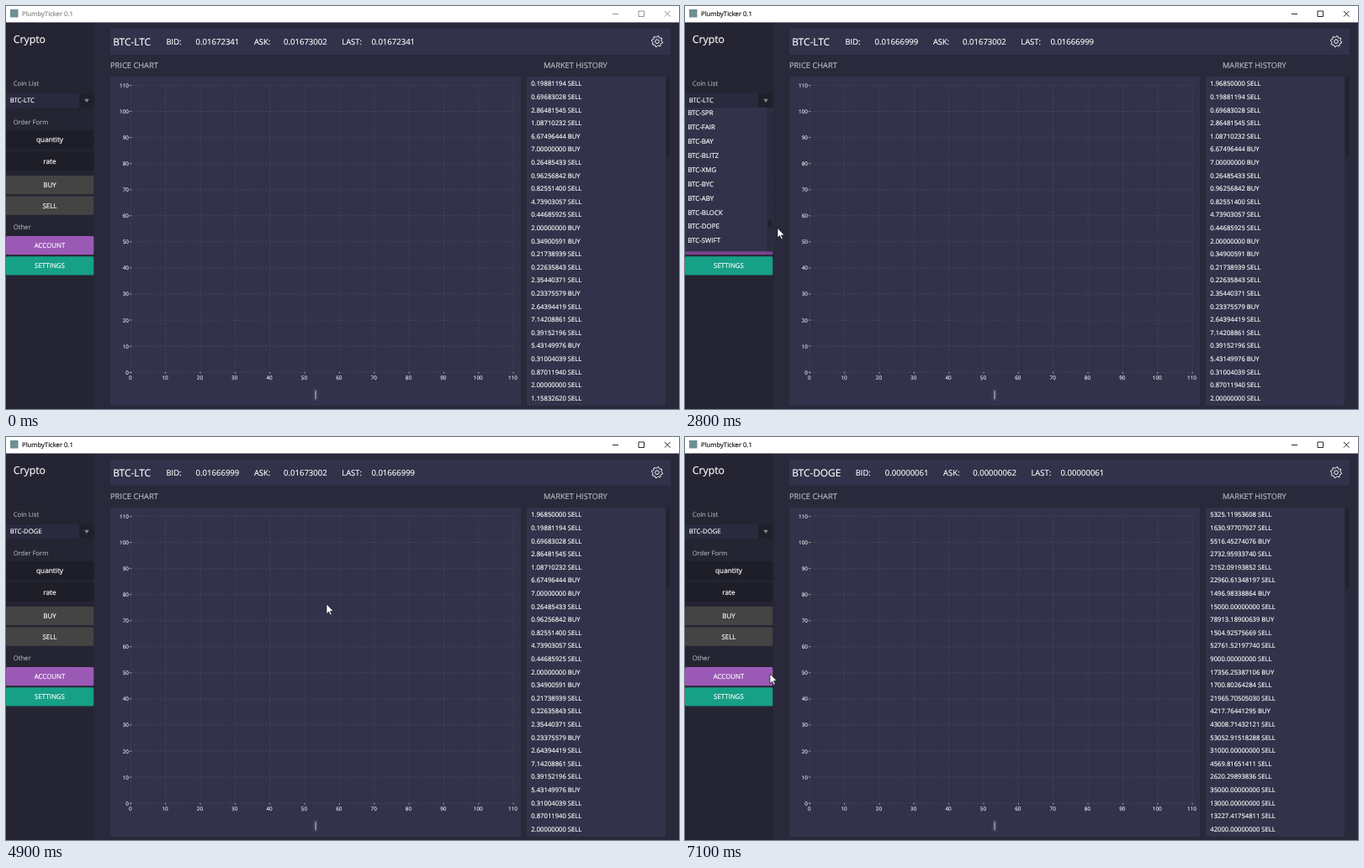
Write an HTML page that moves like this. It is 800x480 px and loops after 7200 ms.

```html
<!DOCTYPE html>
<html lang="en">
<head>
<meta charset="utf-8">
<title>PlumbyTicker</title>
<style>
  html, body { margin: 0; width: 100%; height: 100%; overflow: hidden; background: #29293b; }
  svg { display: block; width: 800px; height: 480px; }
  text {
    font-family: "Open Sans", "Noto Sans", sans-serif;
    text-rendering: geometricPrecision;
    white-space: pre;
    fill: currentColor;
    stroke: currentColor;
    stroke-width: .16px;
  }
</style>
</head>
<body>
<svg id="stage" viewBox="0 0 800 480"></svg>
<script>
const LOOP = 7200, STEP = 100;
const ENTER = 400, ACTIVATE = 1300, OPEN = 1600, DRAG_END = 3300, PICK = 4500, LOADED = 5200;
const ROW = 15.6, ROWS = 25, ROW_TOP = 84.9;
const ITEM = 16.94, ITEMS = 250, LAST_TOP = ITEMS - 10, MID = 198, LIST_TOP = 121.6;
const DRAG_TOP = 128.5, DRAG_BOTTOM = 293.2;
const BACK = '#29293b', PANEL = '#32324a', HOVER = '#2a2a3b';
const LIGHT = '#fff', SOFT = '#e2e2e8', HEADING = '#b8b8c0', MUTED = '#a6a6b0';

const stage = document.getElementById('stage');

function add(parent, tag, attrs) {
  const el = document.createElementNS('http://www.w3.org/2000/svg', tag);
  for (const k in attrs) el.setAttribute(k, attrs[k]);
  return parent.appendChild(el);
}
const rect = (parent, x, y, width, height, fill, rx = 0) =>
  add(parent, 'rect', { x, y, width, height, fill, rx });
const path = (parent, d, stroke, width = 1) =>
  add(parent, 'path', { d, stroke, 'stroke-width': width, fill: 'none' });

// Places text by the vertical middle of its capitals.
function label(parent, x, mid, size, str, color = LIGHT, anchor = 'start') {
  const el = add(parent, 'text', {
    x, y: mid + size * 0.357, 'font-size': size, color, 'text-anchor': anchor
  });
  el.textContent = str;
  return el;
}
const show = (el, on) => el.setAttribute('visibility', on ? 'visible' : 'hidden');
const write = (el, str) => { if (el.textContent !== str) el.textContent = str; };

function seeded(seed) {
  return () => (seed = seed * 16807 % 2147483647) / 2147483647;
}

function drawWindow() {
  rect(stage, 0, 19, 104.5, 461, '#242432');
  rect(stage, 124, 27, 666, 31, PANEL, 1);
  rect(stage, 124, 84, 488, 392, PANEL, 1);
  rect(stage, 619, 84, 165, 392, PANEL, 1);
  rect(stage, 784.8, 85, 4.4, 95, '#222230', 2);
  rect(stage, 0, 0, 800, 19.5, '#fff');
  rect(stage, 5, 4, 9.5, 9.5, '#6f8f92');
}

function drawSidebar() {
  label(stage, 8.7, 39.2, 12.3, 'Crypto');
  label(stage, 8.7, 92.2, 7.7, 'Coin List', MUTED);
  label(stage, 8.7, 138.5, 7.6, 'Order Form', MUTED);
  label(stage, 8.7, 263.2, 7.7, 'Other', MUTED);
  rect(stage, 0, 104, 87, 17, '#2a2a3e');
  rect(stage, 87, 104, 17.5, 17, '#20202b');
  add(stage, 'path', { d: 'M93.2 110.8h5.6l-2.8 4.2z', fill: '#85858d' });

  const button = (y, fill, str, size = 7.9) => {
    rect(stage, 0, y, 104.3, 22.2, fill, 1.5);
    label(stage, 52, y + 11.3, size, str, LIGHT, 'middle');
  };
  button(148, '#1e1e29', 'quantity', 8.3);
  button(173.5, '#1e1e29', 'rate', 8.3);
  button(202, '#444444', 'BUY');
  button(226.5, '#444444', 'SELL');
  button(274, '#9b59b6', 'ACCOUNT');
  button(298.2, '#16a085', 'SETTINGS');
}

function drawGear(cx, cy) {
  const pts = [];
  for (let i = 0; i < 32; i++) {
    const a = (i + 0.5) * Math.PI / 16, r = i % 4 < 2 ? 6.6 : 5.1;
    pts.push((cx + r * Math.sin(a)).toFixed(2) + ' ' + (cy - r * Math.cos(a)).toFixed(2));
  }
  path(stage, 'M' + pts.join('L') + 'z', LIGHT);
  add(stage, 'circle', { cx, cy, r: 2.3, fill: 'none', stroke: LIGHT });
}

function drawChart() {
  label(stage, 124, 70.7, 9.3, 'PRICE CHART', HEADING);
  for (let i = 0; i <= 11; i++) {
    const x = 148.3 + i * 41.35, y = 436.2 - i * 31.06;
    path(stage, `M149 ${y}H604M${x} 94V436`, '#4a4a5c', 0.7).setAttribute('stroke-dasharray', '2.6 1.7');
    path(stage, `M146.7 ${y}h2.6M${x} 436v2`, '#b0b0b8', 0.8);
    label(stage, 146, y + 0.2, 6.35, i * 10, SOFT, 'end');
    label(stage, x - 0.6, 443.2, 6.35, i * 10, SOFT, 'middle');
  }
  rect(stage, 364.5, 455.5, 7, 15, '#3b3b53', 2);
  rect(stage, 367.1, 458, 2, 10.5, '#8b8b9c', 1);
}

drawWindow();
drawSidebar();
drawGear(774, 42.2);
drawChart();

const title = label(stage, 19, 9.2, 7.7, 'PlumbyTicker 0.1');
const controls = path(stage, 'M721 9.5h7M752 6h6.5v6.5h-6.5zM783 6l6.6 6.6M789.6 6l-6.6 6.6', '#000', 0.9);
const combo = label(stage, 4.7, 112.6, 7.75, '');

// Ticker header
const pair = label(stage, 127.3, 42.7, 11.85, '');
const quotes = add(stage, 'g');
const [bid, ask, last] = ['BID:', 'ASK:', 'LAST:'].map((name, i) => {
  const x = 190.5 + i * 104.4;
  label(quotes, x, 42.7, 9.4, name);
  return label(quotes, x + 35.1, 42.7, 9.55, '');
});

// Market history
label(stage, 639, 70.2, 9.25, 'MARKET HISTORY', HEADING);
const rowHover = rect(stage, 620, 0, 164, ROW, HOVER);
const rows = Array.from({ length: ROWS }, (_, i) => label(stage, 624.3, 92.7 + i * ROW, 7.68, ''));

// Makes a run of trades; a share of them are whole multiples of the lot.
function trades(seed, middle, spread, lot) {
  const rand = seeded(seed);
  return Array.from({ length: ROWS }, () => {
    const raw = middle * Math.exp((rand() * 2 - 1) * spread);
    const amount = rand() < 0.25 ? Math.ceil(raw / lot) * lot : raw;
    return amount.toFixed(8) + (rand() < 0.24 ? ' BUY' : ' SELL');
  });
}
const early = trades(9241, 1.1, 2, 1);
const later = ['1.96850000 SELL', ...early.slice(0, -1)];
const doge = trades(40713, 11000, 2, 1000);

// Coin popup
const clip = add(add(stage, 'defs'), 'clipPath', { id: 'list' });
rect(clip, 0, 121, 104.5, 171);
const popup = add(stage, 'g');
rect(popup, 0, 292, 104.5, 4.6, 'rgba(30,20,45,.28)');
rect(popup, 0, 121, 104.5, 171.3, PANEL);
const list = add(popup, 'g', { 'clip-path': 'url(#list)' });
const cells = Array.from({ length: 12 }, () => ({
  back: rect(list, 0, 0, 97.5, ITEM + 0.1, HOVER),
  text: label(list, 3.2, 0, 7.9, '')
}));
rect(popup, 97.5, 121, 7, 171.3, '#2b2b3f');
const thumb = rect(popup, 98.8, 122, 4.2, 9, '#20202c', 2);

const words = s => s.split(' ');
const head = words('ETH-UKG BTC-UKG USDT-NXT USDT-XVG USDT-ADA ETH-ENG BTC-ENG ETH-ADA USDT-BTG ETH-BTG');
const middle = words('SPR FAIR BAY BLITZ XMG BYC ABY BLOCK DOPE SWIFT');
const tail = words('BLK POT DASH NXT RDD FTC PPC VTC DOGE LTC');
const pool = words('XMR ETC ZEC NEO OMG PAY LSK XLM WAVES SC STEEM GNT DCR REP XEM BAT FUN SNT STRAT ARK');

function coin(i) {
  if (i < head.length) return head[i];
  const name = tail[i - LAST_TOP] || middle[i - MID] || pool[(i * 7 + (i >> 4)) % pool.length];
  return (i < 90 && i % 2 ? 'ETH-' : 'BTC-') + name;
}

// Pointer
const pointer = add(stage, 'g');
add(pointer, 'path', {
  d: 'M0 0V11.6L2.7 9.1L4.5 13.2L6.3 12.4L4.5 8.5H8.2z',
  fill: '#fff', stroke: '#15151c', 'stroke-width': 0.7
});

// The pointer rests between moves.
const moves = [
  { from: 300, to: 700, x: 155, y: 149 },
  { from: 700, to: 1200, x: 96, y: 112 },
  { from: OPEN, to: 2000, x: 100, y: DRAG_TOP },
  { from: 2200, to: 2800, x: 110, y: 264.5 },
  { from: 2800, to: DRAG_END, x: 108, y: DRAG_BOTTOM },
  { from: DRAG_END, to: 3900, x: 61, y: 273.6 },
  { from: PICK, to: 5300, x: 701, y: 124.5 },
  { from: 6200, to: 7000, x: 101, y: 282 }
];
const clamp = v => Math.min(1, Math.max(0, v));
const smooth = u => u * u * (3 - 2 * u);

function pointerAt(t) {
  let x = 262, y = -16;
  for (const m of moves) {
    const e = smooth(clamp((t - m.from) / (m.to - m.from)));
    x += (m.x - x) * e;
    y += (m.y - y) * e;
  }
  return [x, y];
}

function drawPopup(t, x, y) {
  const share = t < DRAG_END ? clamp((y - DRAG_TOP) / (DRAG_BOTTOM - DRAG_TOP)) : 1;
  const pos = share * LAST_TOP, first = Math.floor(pos);
  const over = x < 97.5 && y > LIST_TOP ? Math.floor((y - LIST_TOP) / ITEM + pos) : -1;
  cells.forEach((c, i) => {
    const n = first + i, top = LIST_TOP + (n - pos) * ITEM;
    write(c.text, n < ITEMS ? coin(n) : '');
    c.text.setAttribute('y', top + ITEM / 2 + 2.9);
    c.back.setAttribute('y', top);
    c.back.setAttribute('opacity', n === over || n === ITEMS - 1 ? 1 : 0);
  });
  thumb.setAttribute('y', 122 + share * 160.5);
}

function draw(time) {
  const t = Math.floor(time % LOOP / STEP) * STEP;
  const [x, y] = pointerAt(t);
  const active = t >= ACTIVATE, loaded = t >= LOADED;

  title.setAttribute('color', active ? '#111' : '#858585');
  controls.setAttribute('stroke', active ? '#111' : '#8a8a8a');

  write(combo, t >= PICK ? 'BTC-DOGE' : 'BTC-LTC');
  write(pair, loaded ? 'BTC-DOGE' : 'BTC-LTC');
  quotes.setAttribute('transform', `translate(${loaded ? 12.2 : 0} 0)`);
  const price = loaded ? '0.00000061' : active ? '0.01666999' : '0.01672341';
  write(bid, price);
  write(last, price);
  write(ask, loaded ? '0.00000062' : '0.01673002');

  const shown = loaded ? doge : active ? later : early;
  rows.forEach((r, i) => write(r, shown[i]));
  const row = Math.floor((y - ROW_TOP) / ROW);
  show(rowHover, x > 620 && x < 784 && row >= 0 && row < ROWS);
  rowHover.setAttribute('y', ROW_TOP + row * ROW);

  const open = t >= OPEN && t < PICK;
  popup.setAttribute('display', open ? 'inline' : 'none');
  if (open) drawPopup(t, x, y);

  show(pointer, t >= ENTER);
  pointer.setAttribute('transform', `translate(${x} ${y})`);
}

const start = performance.now();
function tick() {
  draw(performance.now() - start);
  requestAnimationFrame(tick);
}
tick();
</script>
</body>
</html>
```
